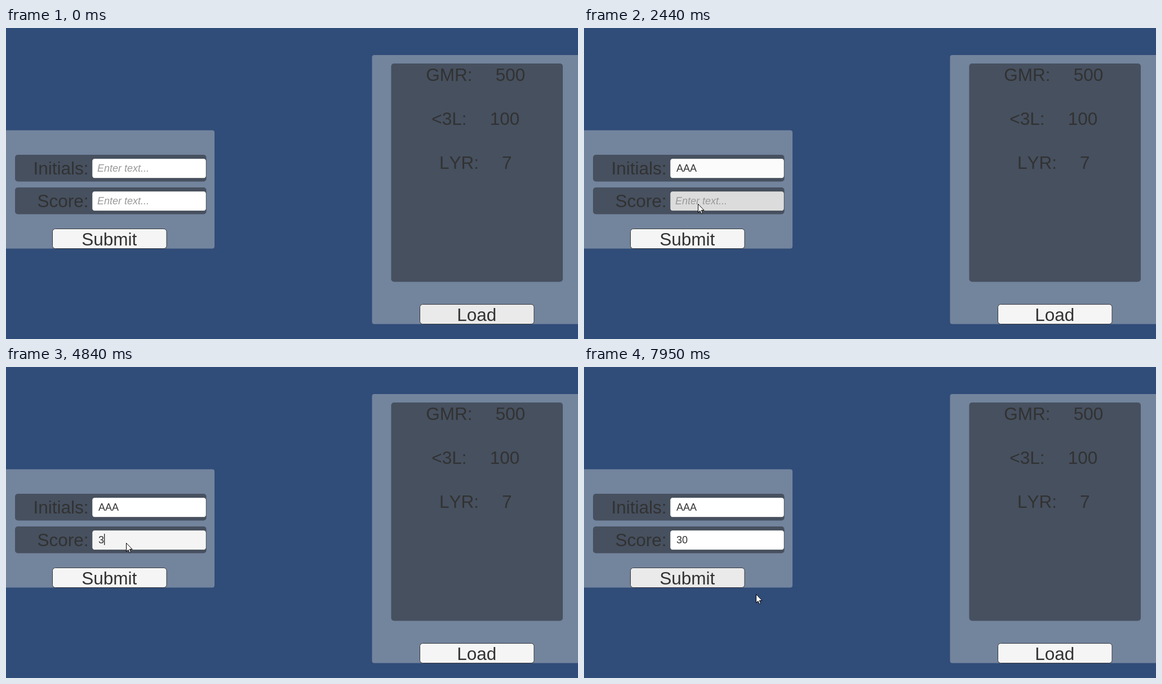
An HTML page that plays this animation: 1015 by 552 pixels, repeating every 8000 ms.

```html
<!DOCTYPE html>
<html lang="en">
<head>
<meta charset="utf-8">
<title>High score form</title>
<style>
html, body { margin: 0; width: 100%; height: 100%; overflow: hidden; background: #304c78; }
svg { display: block; }
text { font: 31.5px "Liberation Sans", Arial, sans-serif; font-kerning: none; fill: #323232; white-space: pre; }
.small { font-size: 18px; }
.hint { font-size: 18px; font-style: italic; fill: #999; }
.end { text-anchor: end; }
.mid { text-anchor: middle; }
.panel { fill: #73849d; }
.slot { fill: #46505f; }
.field { fill: #fff; stroke: #333b46; stroke-width: .8; }
.button { fill: #f5f5f5; stroke: #33373d; }

/* Every change is a hard step on one 8 s clock */
.step { animation: 8s step-end infinite; }
#initials { animation-name: initials; }
#score { animation-name: score; }
#submit { animation-name: submit; }
#load { animation-name: load; }
#hint1 { animation-name: hint1; }
#hint2 { animation-name: hint2; }
#a1 { animation-name: a1; }
#a2 { animation-name: a2; }
#a3 { animation-name: a3; }
#d1 { animation-name: d1; }
#d2 { animation-name: d2; }
#caret { animation-name: caret-move, caret-blink; }
#pointer { animation-name: pointer; }

@keyframes hint1 { 0% { fill-opacity: 1 } 20.25%, 100% { fill-opacity: 0 } }
@keyframes hint2 { 0% { fill-opacity: 1 } 60.5%, 100% { fill-opacity: 0 } }
@keyframes a1 { 0% { fill-opacity: 0 } 20.25%, 100% { fill-opacity: 1 } }
@keyframes a2 { 0% { fill-opacity: 0 } 22.375%, 100% { fill-opacity: 1 } }
@keyframes a3 { 0% { fill-opacity: 0 } 24.375%, 100% { fill-opacity: 1 } }
@keyframes d1 { 0% { fill-opacity: 0 } 60.5%, 100% { fill-opacity: 1 } }
@keyframes d2 { 0% { fill-opacity: 0 } 63.625%, 100% { fill-opacity: 1 } }

@keyframes initials {
  0% { fill: #fff } 13% { fill: #e4e4e4 } 14% { fill: #ededed } 15.125% { fill: #f4f4f4 }
  30.5% { fill: #fbfbfb } 31.5%, 100% { fill: #fff }
}
@keyframes score {
  0% { fill: #fff } 29.5% { fill: #f5f5f5 } 30.5% { fill: #dcdcdc } 31.5% { fill: #d4d4d4 }
  32.5% { fill: #e2e2e2 } 33.5% { fill: #ededed } 35.5% { fill: #f4f4f4 }
  85.125% { fill: #fafafa } 86.125%, 100% { fill: #fff }
}
@keyframes submit {
  0% { fill: #f5f5f5 } 81% { fill: #f0f0f0 } 82% { fill: #ebebeb } 85.125% { fill: #d0d0d0 }
  86.125% { fill: #c8c8c8 } 87.125% { fill: #e6e6e6 } 88.125%, 100% { fill: #eaeaea }
}
@keyframes load {
  0% { fill: #eaeaea } 13% { fill: #eee } 14% { fill: #f2f2f2 } 15.125%, 100% { fill: #f5f5f5 }
}
@keyframes caret-move {
  0% { transform: translate(164px, 238px) }
  20.25% { transform: translate(176px, 238px) }
  22.375% { transform: translate(188px, 238px) }
  24.375% { transform: translate(200px, 238px) }
  30.5% { transform: translate(164px, 296px) }
  60.5% { transform: translate(174px, 296px) }
  63.625%, 100% { transform: translate(184.2px, 296px) }
}
@keyframes caret-blink {
  0%, 30.5%, 38.625%, 53.25%, 70.875%, 85.125%, 100% { opacity: 0 }
  14%, 32.5%, 46%, 60.5%, 78% { opacity: 1 }
}
@keyframes pointer {
  0% { transform: translate(879px, 600px) }
  2.875% { transform: translate(879px, 540px) }
  3.875% { transform: translate(760px, 515px) }
  4.875% { transform: translate(650px, 488px) }
  5.875% { transform: translate(508px, 452px) }
  6.875% { transform: translate(432px, 430px) }
  7.875% { transform: translate(275px, 320px) }
  8.875% { transform: translate(231px, 275px) }
  9.875% { transform: translate(214px, 264px) }
  10.875% { transform: translate(214px, 240px) }
  26.375% { transform: translate(214px, 244px) }
  27.375% { transform: translate(212px, 258px) }
  28.5% { transform: translate(208px, 285px) }
  29.5% { transform: translate(198px, 318px) }
  30.5% { transform: translate(202px, 312px) }
  31.5% { transform: translate(203px, 310px) }
  35.5% { transform: translate(213px, 312px) }
  76% { transform: translate(180px, 285px) }
  77% { transform: translate(90px, 278px) }
  78% { transform: translate(66px, 320px) }
  79% { transform: translate(159px, 343px) }
  80% { transform: translate(180px, 360px) }
  81% { transform: translate(190px, 375px) }
  82% { transform: translate(193px, 381px) }
  90.25% { transform: translate(200px, 385px) }
  91.25% { transform: translate(222px, 392px) }
  92.25% { transform: translate(248px, 398px) }
  93.25% { transform: translate(268px, 401px) }
  94.25% { transform: translate(283px, 402px) }
  95.25% { transform: translate(289px, 403px) }
  99.375%, 100% { transform: translate(305px, 403px) }
}
</style>
</head>
<body>
<svg width="1015" height="552" viewBox="0 0 1015 552">
  <rect class="panel" x="-20" y="181.5" width="390" height="210" rx="4"/>
  <rect class="slot" x="16" y="225" width="339.5" height="47.5" rx="5"/>
  <rect class="slot" x="16" y="283" width="339.5" height="47.5" rx="5"/>
  <text class="end" x="146.5" y="260">Initials:</text>
  <text class="end" x="146.5" y="318">Score:</text>

  <rect id="initials" class="field step" x="152.8" y="231.7" width="202.4" height="35" rx="4.5"/>
  <rect id="score" class="field step" x="152.8" y="289.7" width="202.4" height="35" rx="4.5"/>
  <text id="hint1" class="hint step" x="162" y="255">Enter text...</text>
  <text id="hint2" class="hint step" x="162" y="313">Enter text...</text>
  <text class="small" x="164" y="255"><tspan id="a1" class="step">A</tspan><tspan id="a2" class="step">A</tspan><tspan id="a3" class="step">A</tspan></text>
  <text class="small" x="164" y="313"><tspan id="d1" class="step">3</tspan><tspan id="d2" class="step">0</tspan></text>
  <rect id="caret" class="step" width="1.3" height="20" fill="#222"/>

  <rect id="submit" class="button step" x="82.5" y="356.5" width="202.5" height="35" rx="5"/>
  <text class="mid" x="183.3" y="386">Submit</text>

  <rect class="panel" x="649.5" y="48" width="390" height="477.5" rx="4"/>
  <rect class="slot" x="683.5" y="63" width="304.5" height="387.5" rx="5"/>
  <text x="745.3" y="94">GMR:</text><text x="868.8" y="94">500</text>
  <text x="755.3" y="172">&lt;3L:</text><text x="858.8" y="172">100</text>
  <text x="769" y="250">LYR:</text><text x="880" y="250">7</text>
  <rect id="load" class="button step" x="734.5" y="490.5" width="202.5" height="35" rx="5"/>
  <text class="mid" x="835.2" y="519.5">Load</text>

  <g id="pointer" class="step">
    <path d="M.5 .5V15.5L3.9 12.4 6.2 17.6 8.5 16.6 6.3 11.5H11z" fill="#fff" stroke="#000"/>
  </g>
</svg>
</body>
</html>
```
